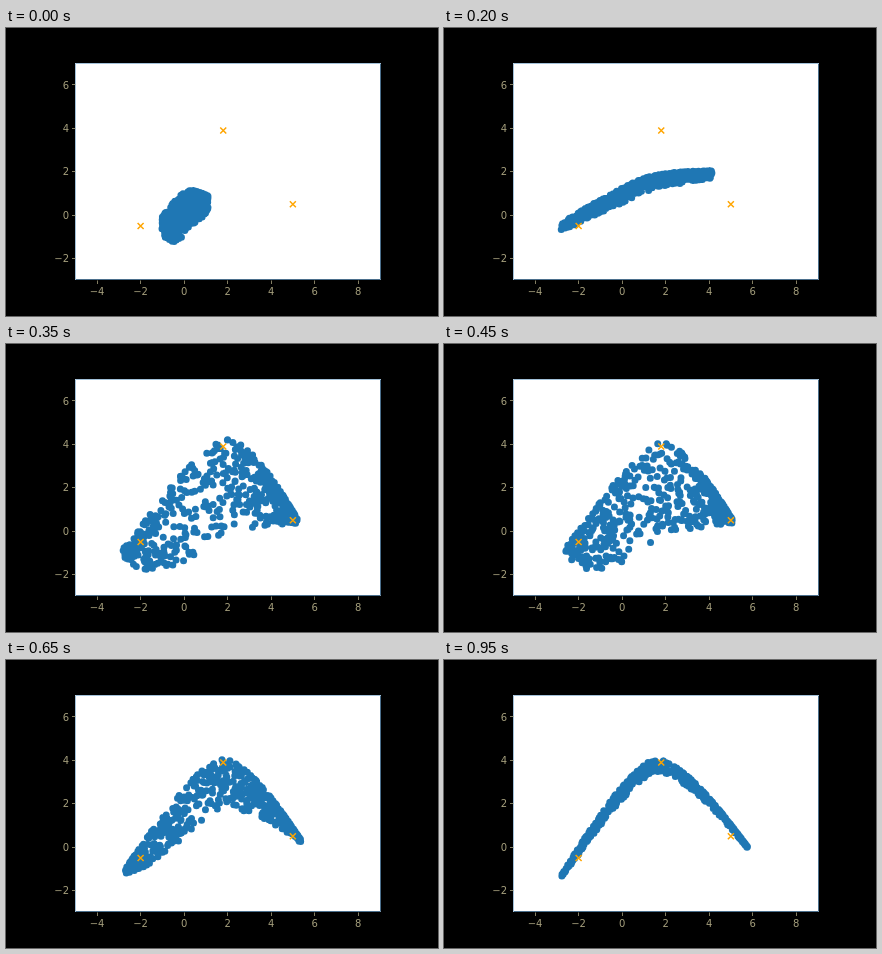
These frames come from a looping animation (432 by 288 pixels, 1000 ms). An HTML page with a canvas:

```html
<!DOCTYPE html>
<html lang="en">
<head>
<meta charset="utf-8">
<title>Scatter plot</title>
<style>
html, body { margin: 0; width: 100%; height: 100%; overflow: hidden; background: #000; }
canvas, svg { position: absolute; left: 0; top: 0; width: 432px; height: 288px; display: block; }
text { font: 10px "DejaVu Sans", sans-serif; fill: #a49e7c; }
.tick { stroke: #a49e7c; stroke-width: .8; }
.spine { fill: none; stroke: #a3c1d9; }
.shade { fill: none; stroke: #4b6f8c; }
.cross { fill: none; stroke: #ffa500; stroke-width: 1.5; }
</style>
</head>
<body>
<canvas id="plot"></canvas>
<svg id="axes" viewBox="0 0 432 288"></svg>
<script>
const LOOP = 1000, STEP = 50, COUNT = 520;
const px = x => 178.1 + x * 21.75;
const py = y => 187.1 - y * 21.7;
const mix = (a, b, k) => a + (b - a) * k;

// Cloud shapes: left end, crest and right end of the upper edge, thickness at the tips
const blob  = { x: [156, 180, 202], y: [189, 163, 168], tip: 14 };
const band  = { x: [117, 200, 268], y: [195, 150, 143], tip: 7 };
const wedge = { x: [119, 219, 288], y: [203, 95, 173],  tip: 5 };
const arc   = { x: [116, 211, 304], y: [217, 98, 187],  tip: 1 };

const svg = document.getElementById('axes');
function add(tag, attrs, text) {
  const el = document.createElementNS('http://www.w3.org/2000/svg', tag);
  for (const k in attrs) el.setAttribute(k, attrs[k]);
  if (text) el.textContent = text;
  svg.append(el);
}
const label = n => String(n).replace('-', '\u2212');

add('path', { class: 'shade', d: 'M374.5 35V251.5H69' });
add('path', { class: 'spine', d: 'M69.5 252V35.5H375' });
for (let n = -4; n <= 8; n += 2) {
  const x = px(n);
  add('path', { class: 'tick', d: `M${Math.floor(x) + .5} 252.5v3.5` });
  add('text', { x, y: 267, 'text-anchor': 'middle' }, label(n));
}
for (let n = -2; n <= 6; n += 2) {
  const y = py(n);
  add('path', { class: 'tick', d: `M66 ${Math.floor(y) + .5}h3.5` });
  add('text', { x: 63, y: y + 3.7, 'text-anchor': 'end' }, label(n));
}
for (const [x, y] of [[1.8, 3.9], [5, .5], [-2, -.5]]) {
  add('path', { class: 'cross', d: `M${px(x) - 3} ${py(y) - 3}l6 6m0 -6l-6 6` });
}

const canvas = document.getElementById('plot');
const ctx = canvas.getContext('2d');
const dpr = window.devicePixelRatio || 1;
canvas.width = 432 * dpr;
canvas.height = 288 * dpr;
ctx.scale(dpr, dpr);

function random(seed) {
  let a = seed;
  return () => {
    a = a + 0x6D2B79F5 | 0;
    let t = Math.imul(a ^ a >>> 15, 1 | a);
    t = t + Math.imul(t ^ t >>> 7, 61 | t) ^ t;
    return ((t ^ t >>> 14) >>> 0) / 4294967296;
  };
}

function blend(a, b, k) {
  const each = key => a[key].map((v, i) => mix(v, b[key][i], k));
  return { x: each('x'), y: each('y'), tip: mix(a.tip, b.tip, k) };
}

function shapeAt(time) {
  if (time < 200) return blend(blob, band, time / 200);
  if (time < 300) return blend(band, wedge, (time - 200) / 100);
  const age = time - 300;
  const shape = blend(wedge, arc, age / 650);
  // The cloud overshoots and settles
  const scale = 1 + .09 * Math.exp(-age / 250) * Math.cos(2 * Math.PI * age / 250);
  shape.x = shape.x.map(v => mix(205, v, scale));
  shape.y = shape.y.map(v => mix(150, v, scale));
  return shape;
}

function depthAt(time) {
  if (time < 200) return mix(30, 8, time / 200);
  const full = 12 + 80 / (1 + Math.exp((time - 640) / 45));
  return mix(8, full, Math.min(1, (time - 200) / 100));
}

// Smooth curve through three points
function curve([p, q, r], t) {
  const right = t > .5, u = right ? 2 - 2 * t : 2 * t;
  const end = right ? r : p, far = right ? p : r;
  const bulge = (2 * q - p - r) / 4;
  return mix(end, q, u) + bulge * u * (1 - u * u) * 2 / 3 + 0 * far;
}

// Samples crowd both ends, a little more on the right
const spread = r => Math.pow(r - .45 * Math.sin(2 * Math.PI * r) / (2 * Math.PI), .85);

function draw(step) {
  const time = step * STEP;
  const { x: xs, y: ys, tip } = shapeAt(time);
  const depth = depthAt(time);
  const rnd = random(71 + step * 977);
  ctx.fillStyle = '#fff';
  ctx.fillRect(69, 35, 306, 217);
  ctx.fillStyle = '#1f77b4';
  ctx.beginPath();
  for (let i = 0; i < COUNT; i++) {
    const t = spread(rnd());
    const w = Math.pow(rnd(), 1 + t);
    const x = curve(xs, t);
    const y = curve(ys, t) + w * (tip + depth * Math.sin(Math.PI * Math.pow(t, .8)));
    ctx.moveTo(x + 3.5, y);
    ctx.arc(x, y, 3.5, 0, 7);
  }
  ctx.fill();
}

const start = performance.now();
let shown = -1;
function tick() {
  const step = Math.floor((performance.now() - start) % LOOP / STEP);
  if (step !== shown) draw(shown = step);
  requestAnimationFrame(tick);
}
tick();
</script>
</body>
</html>
```
